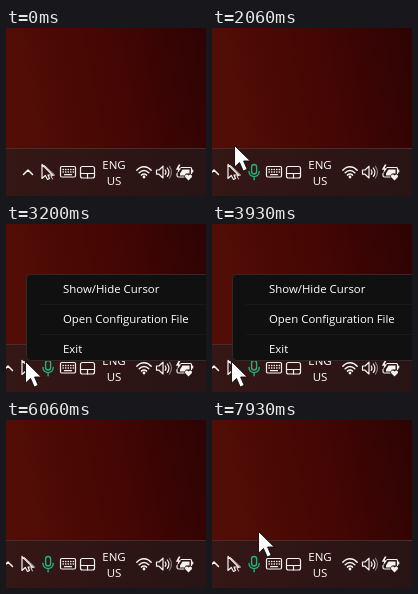
These frames come from a looping animation (200x168 px, 8000 ms). An HTML page:

```html
<!DOCTYPE html>
<html lang="en">
<head>
<meta charset="utf-8">
<title>Tray menu</title>
<style>
html, body { margin: 0; width: 100%; height: 100%; overflow: hidden; background: #260403; }
svg { display: block; width: 100vw; height: 100vh; }
text { font-family: "Open Sans", "Noto Sans", sans-serif; font-weight: 500; fill: #fff; }
.lang { font-size: 11.5px; text-anchor: middle; }
.menu text { font-size: 11.4px; }
.icon { fill: none; stroke: #f6f2f0; stroke-width: 1.2; stroke-linecap: round; stroke-linejoin: round; }
.solid { fill: #f6f2f0; stroke: none; }
.mic { stroke: #1fb479; stroke-width: 1.4; }

.shift, .mic, .menu, .pointer, .seen { animation: 8s linear infinite; }
.shift { animation-name: shift; animation-timing-function: step-end; }
.mic { animation-name: mic; animation-timing-function: step-end; }
.seen { animation-name: seen; animation-timing-function: step-end; }
.menu { animation-name: menu; }
.pointer { animation-name: pointer; }

@keyframes shift {
  0% { transform: translateX(20px); }
  .75%, 100% { transform: none; }
}
@keyframes mic {
  0% { opacity: 0; }
  .75%, 100% { opacity: 1; }
}
@keyframes menu {
  0%, 37.4% { opacity: 0; }
  39.5%, 62.5% { opacity: 1; }
  64.1%, 100% { opacity: 0; }
}
@keyframes seen {
  0% { opacity: 0; }
  7.5% { opacity: 1; }
  67.4% { opacity: 0; }
  87.5%, 100% { opacity: 1; }
}
@keyframes pointer {
  0%, 7.5% { transform: translate(48px, 54px); }
  10.75% { transform: translate(43px, 62px); }
  14.125% { transform: translate(34px, 82px); }
  17.5%, 20% { transform: translate(25px, 111px); }
  23.25%, 30% { transform: translate(22px, 117px); }
  34.125%, 49.9% { transform: translate(19px, 137px); }
  54.125%, 62.5% { transform: translate(70px, 68px); }
  66.6%, 67.4% { transform: translate(78px, 6px); }
  87.5%, 95.7% { transform: translate(69px, 66px); }
  99.1%, 100% { transform: translate(46px, 111px); }
}
</style>
</head>
<body>
<svg viewBox="0 0 200 168" preserveAspectRatio="none">
  <defs>
    <linearGradient id="wall" x2="1" y2="-.12">
      <stop offset="0" stop-color="#520e06"/>
      <stop offset=".25" stop-color="#4b0904"/>
      <stop offset=".55" stop-color="#420604"/>
      <stop offset=".8" stop-color="#360404"/>
      <stop offset="1" stop-color="#2d0303"/>
    </linearGradient>
    <linearGradient id="bar" x2="1">
      <stop offset="0" stop-color="#351715"/>
      <stop offset="1" stop-color="#281415"/>
    </linearGradient>
  </defs>

  <rect width="200" height="120" fill="url(#wall)"/>
  <rect y="120" width="200" height="48" fill="url(#bar)"/>
  <rect y="120" width="200" height="1" fill="#4a2c29"/>

  <g class="icon">
    <g class="shift">
      <path d="M-2.500 146.500 2 142l4.500 4.500" stroke-width="1.5"/>
      <path d="M16 136.500V150.500l3.300-3 2.200 4 2-1-1.500-3.500h4.500Z"/>
      <path d="M18.500 137.500l10 9.500-3.500 1 1.500 3" stroke-width=".9"/>
    </g>
    <g class="mic">
      <rect x="39.600" y="136.500" width="5" height="9.500" rx="2.500"/>
      <path d="M37 143.500c0 6.800 10.200 6.800 10.200 0M42.100 148.700v3"/>
    </g>

    <rect x="54.500" y="138.500" width="15" height="10.500" rx="1.200"/>
    <path d="M57 141.500h10.500M57 144h10.500" stroke-width="1.400" stroke-dasharray=".3 2.250"/>
    <path d="M58.500 146.700h7"/>

    <rect x="74.500" y="138.500" width="14" height="11.500" rx="2"/>
    <path d="M74.500 145.500h14M81.500 145.500v4.500"/>

    <path d="M130.800 142.200c4.100-4.700 10.300-4.700 14.400 0M133.200 144.700c2.800-3.100 6.800-3.100 9.600 0M135.500 147.100c1.500-1.600 3.500-1.600 5 0" stroke-width="1.500"/>
    <circle class="solid" cx="138" cy="149" r="1.400"/>

    <path d="M150.500 142h2.500l4-3.800v11.800l-4-3.800h-2.500Z"/>
    <path d="M159.200 142c1 1.300 1 3 0 4.300M161.300 140c2 2.500 2 5.800 0 8.300"/>
    <path d="M163.400 138.300c2.600 3.600 2.600 8.100 0 11.700" opacity=".45"/>

    <path d="M175 139.500h9.500q1 0 1 1v5M178 149h-5.500q-1.500 0-1.500-1.500v-2M186.700 142v2"/>
    <path class="solid" d="M176.500 141.500h7v4h-3.500l-1.500 2h-4.500v-2Z"/>
    <path class="solid" d="M172.800 136.500l-3 5.300h2.400l-1.200 4 4.200-5.600h-2.500l1.800-3.700Z"/>
    <path class="solid" d="M182.500 152.500l-3.200-3.300c-1.300-1.700 1.200-4 3.200-1.700 2-2.300 4.500 0 3.200 1.700Z"/>
  </g>
  <text class="lang" x="108" y="141">ENG</text>
  <text class="lang" x="108" y="157">US</text>

  <g class="menu">
    <rect x="20.500" y="50.500" width="184" height="86" rx="4" fill="#101010" stroke="#302a29"/>
    <path d="M34 80.500h166M34 110.500h166" stroke="#1a1919"/>
    <text x="57" y="69">Show/Hide Cursor</text>
    <text x="57" y="99">Open Configuration File</text>
    <text x="57" y="129">Exit</text>
  </g>

  <g class="pointer">
    <path class="seen" d="M.5.5V22.200l5-4.700 3.700 8.500 4-1.700-3.600-8.300h6.700Z" fill="#fff" stroke="#100808" stroke-width=".9"/>
  </g>
</svg>
</body>
</html>
```
